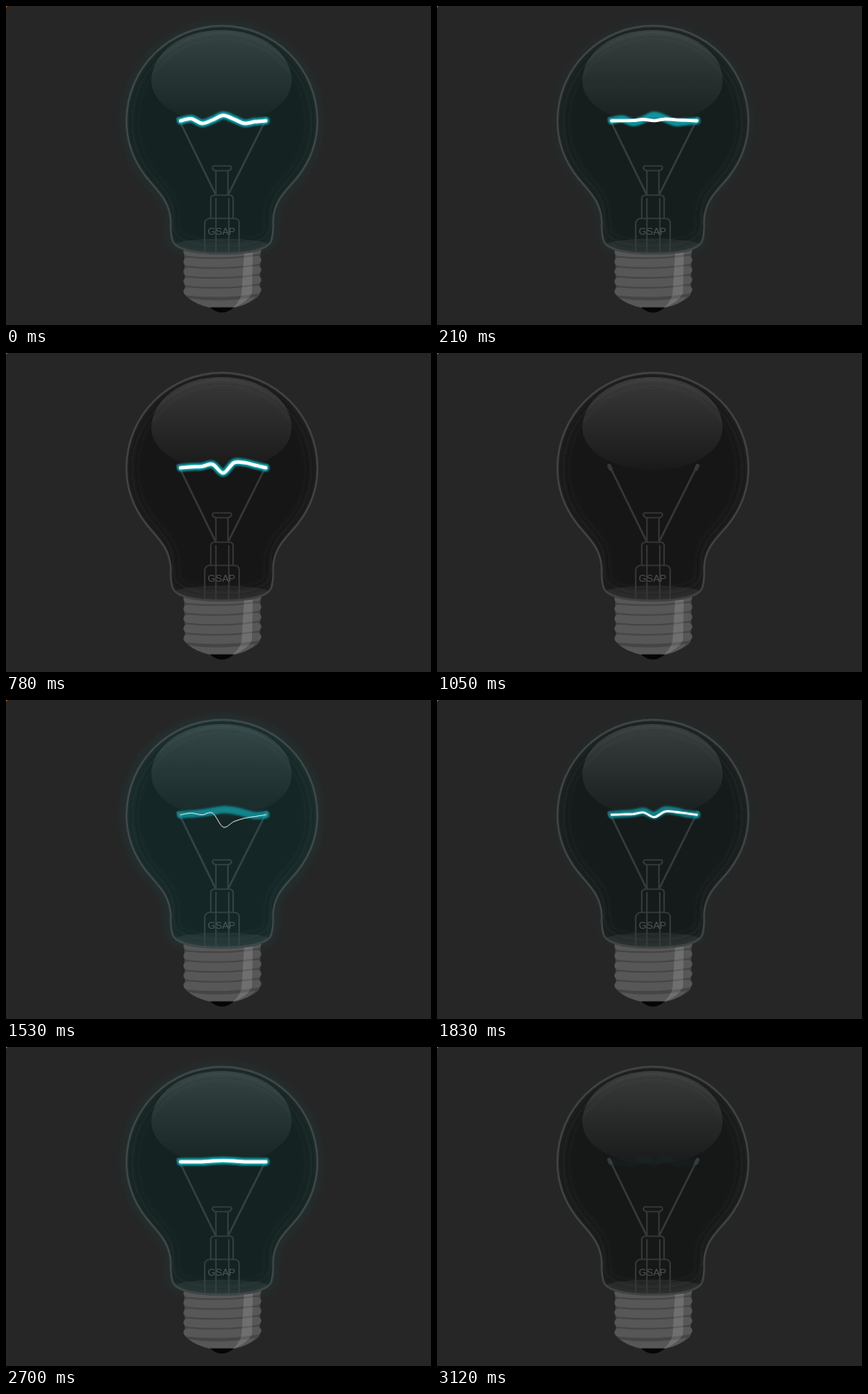
Animation of 494x371 px, one loop 3180 ms. Source, as an HTML page:

```html
<!DOCTYPE html>
<html lang="en">
<head>
<meta charset="utf-8">
<title>Flickering bulb</title>
<style>
  html, body { margin: 0; width: 100%; height: 100%; overflow: hidden; background: #262626; }
  svg { display: block; width: 100vw; height: 100vh; }
</style>
</head>
<body>
<svg viewBox="0 0 494 371" fill="none" stroke-linecap="round" stroke-linejoin="round">
  <defs>
    <path id="glass" d="M251 23C312 23 362 72 362 134C362 160 353 181 339 199C326 215 311 226 310.500 250Q311 262 309 271C307 284 280 288 251 288S195 284 193 271Q191 262 191.500 250C190 226 176 215 163 199C149 181 140 160 140 134C140 72 190 23 251 23Z"/>
    <clipPath id="inside"><use href="#glass"/></clipPath>
    <linearGradient id="shine" x2="0" y2="1">
      <stop stop-color="#fff" stop-opacity=".15"/>
      <stop offset="1" stop-color="#fff" stop-opacity=".015"/>
    </linearGradient>
    <filter id="soft" x="-20%" y="-20%" width="140%" height="140%"><feGaussianBlur stdDeviation="5"/></filter>
    <filter id="blur" filterUnits="userSpaceOnUse" x="180" y="100" width="144" height="70"><feGaussianBlur stdDeviation="1.300"/></filter>
  </defs>
  <rect width="494" height="371" fill="#262626"/>
  <circle r="1.500" fill="#c46a10"/>
  <use id="halo" href="#glass" stroke="#0cc" stroke-width="14" filter="url(#soft)"/>

  <path d="M207 281H296L295 335Q292 343 264 351H238Q211 343 208 335Z" fill="#454545"/>
  <g id="threads" stroke="#575757" stroke-width="9.500"/>
  <path d="M213 340Q250 346 290 338Q284 347 264 351H238Q220 347 213 340Z" fill="#575757"/>
  <path d="M277 283H287L286 334Q280 345 264 351Q274 341 274 332Z" fill="#fff" fill-opacity=".14"/>
  <path d="M237 350.500H265Q258 356.500 251 356.500T237 350.500Z" fill="#050505"/>

  <use href="#glass" fill="#1f1f1f"/>
  <g clip-path="url(#inside)">
    <use href="#glass" fill="#161616" filter="url(#soft)" transform="translate(20 12) scale(.92)"/>
    <ellipse cx="251" cy="279" rx="56" ry="8.500" fill="#fff" fill-opacity=".06"/>
  </g>
  <path d="M169 87C169 54 205 28 250.500 28S332 54 332 87C332 115 296 136 250.500 136S169 115 169 87Z" fill="url(#shine)"/>
  <g stroke="#373737" stroke-width="1.700">
    <path d="M201 132L243 218M302 132L259 218" stroke-width="2.300"/>
    <path d="M200 131L202 135M303 131L301 135" stroke-width="4.500"/>
    <path d="M241 186H261Q264 189 259 191.500H243Q238 189 241 186ZM244 192V219M258 192V219M238 224Q238 220 243 220H259Q264 220 264 224M238 224V247M264 224V247M244 224V286M259 224V286M231 286V252Q232 247 238 247H264Q271 247 271 252V286"/>
  </g>
  <text x="250.500" y="266" text-anchor="middle" font-family="Arial, 'Liberation Sans', sans-serif" font-size="11.500" fill="#505050">GSAP</text>
  <use href="#glass" stroke="#424242" stroke-width="2.300"/>
  <use id="glow" href="#glass" fill="#0cc"/>
  <path id="band" stroke="#0cb4c0" stroke-width="8.500" filter="url(#blur)"/>
  <path id="core" stroke="#fff"/>
</svg>
<script>
const $ = id => document.getElementById(id);
const LOOP = 3180;

$('threads').innerHTML = [285, 296.5, 308, 319.5, 331]
  .map(y => `<path d="M211 ${y + 1}Q250 ${y + 5} 292 ${y - 1}"/>`).join('');

// Filament offsets at seven inner points; both ends stay fixed.
const flat = [0, 0, 0, 0, 0, 0, 0];
const bump = [0, 0, -1, -1.5, -1, 0, 0];
const wave = [-2.5, 3, -1, -6.5, -2, 3, 1];
const roll = [0, -1, -6, -4, 2, 5, 3];
const wing = [-1, -1.5, -4, 6, -6, -6, -3];
const dip = [-2, 0, -2, 14.5, 8, 4, 2];
const swell = [-1, -2, -4, -6, -5, -2, 1];
const jag = [1, 2, -3, 2, -3, 2, 1];

// time, bulb glow, core width, band opacity, core shape, band shape.
// A core width of 0 holds that pose until the next key.
const keys = [
  [0, .75, 4, .9, wave, wave],
  [90, .9, 2, .8, dip, swell],
  [190, .5, 4, .8, bump, wave],
  [300, .25, 3, .7, wing, swell],
  [400, .1, 4, .7, wave, roll],
  [480, 0, 4, .65, flat, roll],
  [540, 0, 0, .05, flat, roll],
  [570, .8, 4, .9, bump, bump],
  [680, .4, 2, .8, wave, swell],
  [780, 0, 4, .9, wing, wing],
  [900, .35, 3, .7, dip, wing],
  [1000, .1, 4, .6, flat, wave],
  [1050, 0, 0, 0, flat, wave],
  [1530, 1, .8, .65, dip, swell],
  [1650, .6, 4, .8, wave, roll],
  [1770, .3, 3, .7, wing, wing],
  [1910, .4, 2, .6, bump, swell],
  [2040, .15, 0, .2, flat, roll],
  [2100, .1, 0, .14, flat, roll],
  [2130, .07, 0, .1, flat, roll],
  [2700, .75, 4, .9, bump, bump],
  [2820, .5, 2, .8, dip, wave],
  [2940, .2, 4, .8, wave, swell],
  [3050, .2, 3, .5, wing, roll],
  [3120, .04, 0, .03, flat, jag]
];

const mix = (a, b, p) => Array.isArray(a) ? a.map((v, i) => mix(v, b[i], p)) : a + (b - a) * p;

// Catmull-Rom curve through the filament points.
function curve(offsets) {
  const pts = [0, ...offsets, 0].map((y, i) => [203 + i * 12.375, 133.5 + y]);
  const at = i => pts[Math.max(0, Math.min(pts.length - 1, i))];
  let d = 'M' + pts[0];
  for (let i = 0; i < pts.length - 1; i++) {
    const [a, b, c, e] = [at(i - 1), at(i), at(i + 1), at(i + 2)];
    const c1 = b.map((v, k) => v + (c[k] - a[k]) / 6);
    const c2 = c.map((v, k) => v - (e[k] - b[k]) / 6);
    d += `C${c1} ${c2} ${c}`;
  }
  return d;
}

function draw(now) {
  const t = now % LOOP;
  const i = keys.findLastIndex(k => k[0] <= t);
  const a = keys[i], b = keys[i + 1] || a;
  const p = a[2] === 0 ? 0 : (t - a[0]) / (b[0] - a[0]);
  const [, glow, width, band, coreShape, bandShape] = mix(a, b, p);
  $('glow').style.opacity = glow * .085;
  $('halo').style.opacity = glow * .05;
  $('core').setAttribute('d', curve(coreShape));
  $('core').style.strokeWidth = width;
  $('band').setAttribute('d', curve(bandShape));
  $('band').style.opacity = band;
}

const start = performance.now();
function tick() {
  draw(performance.now() - start);
  requestAnimationFrame(tick);
}
tick();
</script>
</body>
</html>
```
